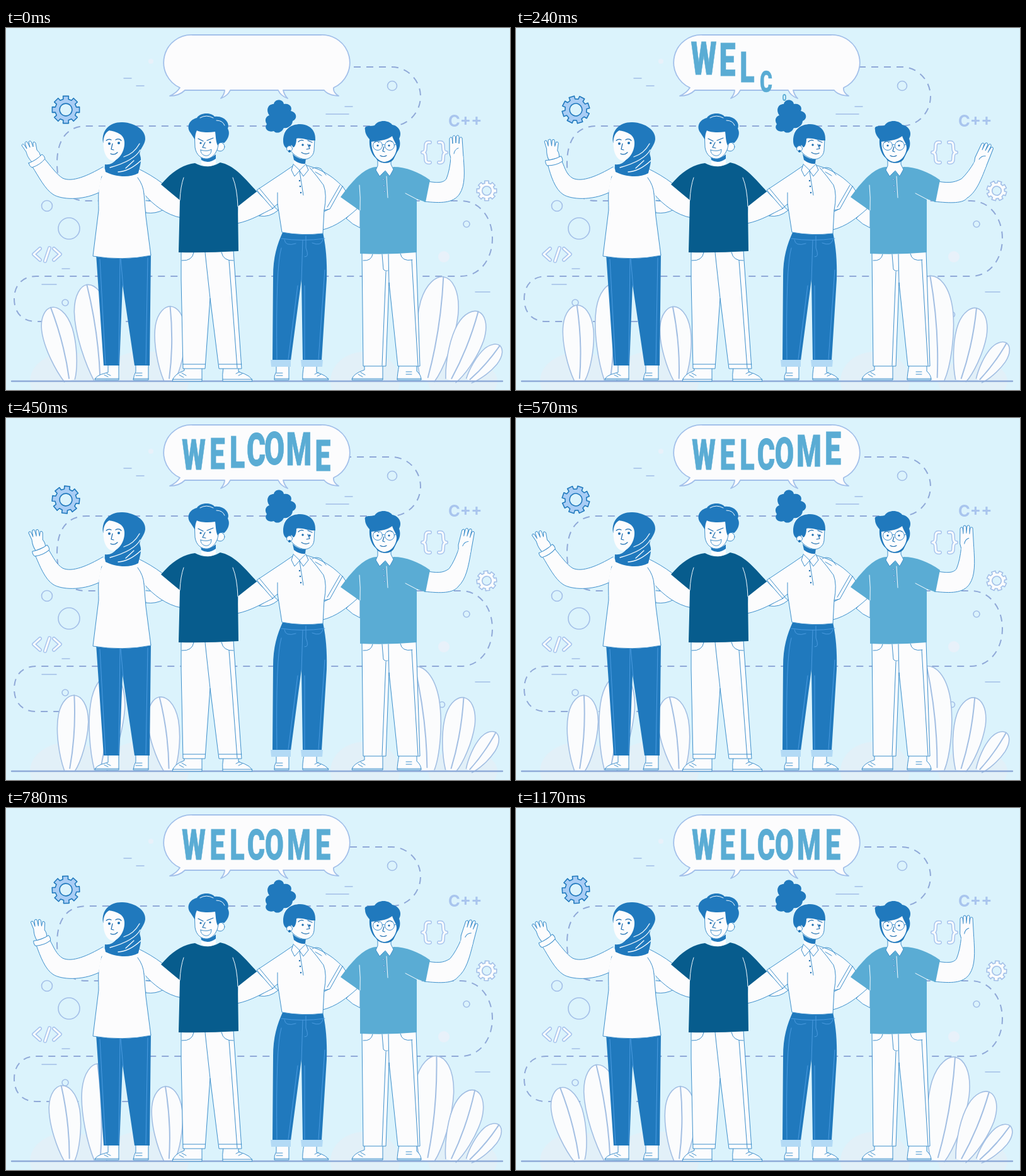
Write an HTML page that moves like this. It is 800 px wide and 576 px high and loops after 1200 ms.

```html
<!DOCTYPE html>
<html lang="en">
<head>
<meta charset="utf-8">
<title>Welcome</title>
<style>
html, body { margin: 0; width: 100%; height: 100%; overflow: hidden; background: #dbf3fc; }
svg { display: block; width: 800px; height: 576px; }
path, circle, ellipse { fill: none; stroke-linecap: round; stroke-linejoin: round; }
.people { stroke: #3f90cc; stroke-width: 1; }
.people .w { fill: #fcfcfd; }
.people .b { fill: #2079bd; stroke: none; }
.people .navy { fill: #075c8d; stroke: none; }
.people .sky { fill: #5aacd4; stroke: none; }
.people .cuff { fill: #b3daf5; stroke: none; }
.people .seam { stroke: #4a9be0; }
.people .light { stroke: #f4fbff; }
.people .ink { stroke: #1b6db0; stroke-width: 1.2; }
.people .dot { fill: #1b6db0; stroke: none; }
.deco { stroke: #a3bfe8; stroke-width: 1.6; }
.spot { fill: #e8f1fa; }
.bubble { fill: #fcfcfd; stroke: #a3c0ea; stroke-width: 1.8; }
.trail { stroke: #90a9d8; stroke-width: 2; stroke-dasharray: 11 9; stroke-linecap: butt; }
.leaf { fill: #fbfcfd; stroke: #a3bfe3; stroke-width: 1.6; }
.vein { stroke: #a3bfe3; stroke-width: 2; }
.mound ellipse { fill: #e2f0f8; }
.glyph { stroke: #a9c5ee; stroke-width: 6; }
.glyph.in { stroke: #fafcfd; stroke-width: 3; }
#letters text { font: 900 67.5px Roboto, sans-serif; fill: #5aacd4; stroke: #5aacd4; stroke-width: .8; text-anchor: middle; }
.cpp { font: 700 25.5px Inter, sans-serif; fill: #a9c5ee; }
</style>
</head>
<body>
<svg viewBox="0 0 800 576">
  <path id="trail" class="trail" d="M545 62H612A46 47 0 0 1 612 156H128C95 156 81 180 81 215C81 252 95 275 128 275H722C752 275 772 302 772 335S752 395 722 395H48C25 395 13 410 13 431S25 467 48 467H222"/>

  <g class="deco">
    <circle cx="613" cy="92" r="7.5"/><circle cx="65" cy="283" r="8.5"/><circle cx="100" cy="319" r="17"/>
    <circle cx="731" cy="312" r="5"/><circle cx="94" cy="437" r="5"/><circle cx="692" cy="456" r="4.5"/>
    <path d="M187 80H199M207 92H219M508 137H544M538 125H550M57 408H80M89 383H101M745 420H768"/>
  </g>
  <circle class="spot" cx="695" cy="364" r="9"/><circle class="spot" cx="230" cy="53" r="4"/>
  <text class="cpp" x="702" y="157">C++</text>
  <defs>
    <path id="code" d="M54 351L44 360L54 369M69 350L62 371M76 351L86 360L76 369"/>
    <path id="braces" d="M673 182C666 181 666 185 666 190C666 195 665 198 661 198C665 198 666 201 666 206C666 211 666 215 673 214M687 182C694 181 694 185 694 190C694 195 695 198 699 198C695 198 694 201 694 206C694 211 694 215 687 214"/>
  </defs>
  <use href="#code" class="glyph"/><use href="#code" class="glyph in"/>
  <use href="#braces" class="glyph"/><use href="#braces" class="glyph in"/>
  <g id="gears"></g>

  <path class="bubble" d="M296 11H500A44 44 0 0 1 520 95Q519 103 528 108Q511 107 505 99H440Q442 107 447 112Q436 108 432 99H356Q352 108 341 112Q347 105 347 99H284Q275 108 260 108Q270 104 276 95A44 44 0 0 1 296 11Z"/>
  <g id="letters"></g>

  <g class="mound">
    <ellipse cx="100" cy="562" rx="62" ry="46"/><ellipse cx="220" cy="562" rx="70" ry="48"/>
    <ellipse cx="570" cy="562" rx="55" ry="47"/><ellipse cx="725" cy="562" rx="55" ry="34"/>
  </g>
  <g id="plants"></g>
  <path d="M9 562H788" stroke="#8eaad8" stroke-width="2.4"/>

  <g class="people">
    <!-- arms that reach behind backs -->
    <path class="w" d="M219 275L222 294Q238 296 250 289L238 276Z"/>
    <path class="w" d="M402 299Q418 302 432 290L425 284Z"/>
    <path class="w" d="M398 260L368 282L367 311C390 306 405 296 424 287Z"/>
    <path class="w" d="M556 286L540 303Q550 313 562 318V290Z"/>
    <path class="w" d="M534 252L513 288L503 293V321C525 315 540 303 557 288Z"/>

    <!-- woman with headscarf -->
    <path class="w" d="M162 535V548L158 549Q142 553 141 560H179V535Z"/>
    <path class="w" d="M206 535V547Q203 552 202 560H226V535Z"/>
    <path d="M160 550l6 3M156 552l6 3M141 558H179M206 549h10M206 553h10M202 558H226"/>
    <path class="b" d="M143 360L155 537H180L185 408L204 537H228L230 360Z"/>
    <path class="seam" d="M182 366L186 412M181 366L179 535M149 368L158 535M225 366L222 535"/>
    <path class="w" d="M210 224C236 236 262 256 278 274V302C254 297 234 282 219 264Z"/>
    <path class="w" stroke="none" d="M152 222Q182 240 212 225L221 238L222 300L230 362Q185 371 138 363L147 290L146 250Z"/>
    <path d="M152 236C145 250 147 270 147 290L138 363Q185 371 230 362L222 300L219 264"/>
    <path d="M209 238Q218 250 219 264"/>
    <path class="w" id="armL"/>
    <g id="handL">
      <path class="w" d="M41 213C34 206 33 200 32 197L25 187q1-4 4-1L33 192L30 183q2-4 4-1L38 190L36 181q2-3 4 0L43 189L43 182q2-2 4 1L49 194Q54 198 55 204Z"/>
      <path class="w" d="M36 215Q49 210 57 201Q61 203 62 208Q54 218 41 222Q37 220 36 215Z"/>
    </g>
    <path class="b" d="M154 182C151 162 166 149 185 150C206 151 222 163 221 177C220 188 210 194 213 203C216 211 212 222 210 231C196 239 174 237 158 229Q156 223 157 217Q168 219 176 208Z"/>
    <path class="w" stroke="none" d="M155 190C153 175 157 166 164 163C174 165 187 168 188 181C189 196 180 208 172 211C163 212 156 203 155 190Z"/>
    <path class="light" stroke-width="1.3" d="M212 184Q203 200 187 205M213 194Q204 211 165 222M214 211Q196 228 178 229M203 211L190 223"/>
    <path class="ink" d="M159 179q4-3 8-1M174 178q5-3 9 1M169 184L167 193L171 194M166 200q6 3 11-2"/>
    <circle class="dot" cx="164" cy="184" r="2"/><circle class="dot" cx="179" cy="183" r="2"/>

    <!-- man in navy shirt -->
    <path class="w" d="M283 540V545Q266 551 264 562H311V540Z"/>
    <path class="w" d="M345 540Q343 552 344 562H391Q390 553 369 547V540Z"/>
    <path d="M279 549l7 4M275 552l7 4M264 559H311M365 550l6-3M369 553l6-3M344 559H391"/>
    <path class="w" d="M278 355V400L281 542H316L324 430L338 542H374L361 355Z"/>
    <path d="M316 357L324 430M281 535H316M338 535H374M279 370Q296 371 298 357M342 357Q345 371 361 370M354 370L367 541"/>
    <path class="navy" d="M300 215Q320 226 340 214C362 218 380 240 398 260L368 284L369 355Q320 358 274 357L276 274L246 249C262 230 280 217 300 215Z"/>
    <path class="light" d="M282 238Q277 252 276 274M360 238Q367 255 368 284"/>
    <path class="w" stroke="none" d="M310 200V217Q321 224 333 216V195Z"/>
    <path class="b" d="M309 203Q320 212 333 201V208Q321 217 310 210Z"/>
    <circle class="w" cx="340" cy="189" r="7"/>
    <path class="w" d="M299 162L300 190C302 203 311 209 320 208C329 206 336 197 337 185L334 162Z"/>
    <path class="b" d="M293 167C287 160 288 147 303 143C308 134 326 134 331 141C347 139 356 152 352 160C357 169 351 179 346 183C342 181 338 183 336 187C333 181 333 172 332 165C320 167 308 166 303 163C301 167 300 172 300 178Z"/>
    <path class="light" d="M308 143Q318 137 329 143M334 147Q344 147 347 155"/>
    <path class="ink" d="M305 176L313 180M319 179L329 175M316 182L312 190L317 191"/>
    <path class="w" d="M309 194C315 196 321 196 326 193C326 202 320 204 316 203C311 202 309 198 309 194Z"/>
    <circle class="dot" cx="309" cy="183" r="1.6"/><circle class="dot" cx="324" cy="182" r="1.6"/>

    <!-- woman with bun -->
    <path class="w" d="M429 536V547Q425 553 426 560H449V536Z"/>
    <path class="w" d="M473 536Q470 552 471 560H512Q510 553 493 548V536Z"/>
    <path d="M429 549h10M429 553h10M426 558H449M490 551l6-3M494 554l6-3M471 558H512"/>
    <path class="b" d="M440 323C430 345 424 365 424 395L423 529H452L469 400L471 529H501L509 400C510 365 507 345 503 325Z"/>
    <path class="seam" d="M437 335Q470 340 506 335M476 331V350Q482 365 474 364M471 337L469 402M442 337Q443 348 460 343M486 342Q500 348 503 337M437 350Q428 380 430 527M463 410L448 527M506 385L496 527M474 410V527"/>
    <path class="cuff" d="M420 528H452V539H421ZM468 528H503L502 539H469Z"/>
    <path class="w" d="M456 219L440 230L398 258L423 287L431 280L438 325Q470 331 503 327L505 290L514 288L534 252C520 238 505 226 478 219Z"/>
    <path d="M431 262L431 281M482 222Q494 236 504 250Q510 265 505 290M486 224Q492 220 500 224L508 234M491 229L501 235M402 255L426 284M530 250L510 285"/>
    <path class="w" stroke="none" d="M456 198L457 218L466 228L476 218V206Z"/>
    <path class="b" d="M455 200L457 210Q466 217 475 216L476 208C468 210 460 206 455 200Z"/>
    <path class="w" d="M456 217L453 226L458 236L466 227ZM476 217L480 226L472 236L466 227ZM466 228L472 266"/>
    <circle class="dot" cx="466" cy="243" r="1.2"/><circle class="dot" cx="467" cy="252" r="1.2"/><circle class="dot" cx="468" cy="262" r="1.2"/>
    <path class="b" d="M425 121C427 112 440 113 441 121C451 119 455 127 452 132C462 134 463 145 455 148C454 158 444 160 441 159C437 168 428 168 425 164C415 167 409 159 414 153C409 145 414 140 418 139C412 130 416 121 425 121Z"/>
    <path class="light" d="M442 165Q450 155 462 153" stroke-width="2"/>
    <path class="w" d="M453 180C462 170 480 170 490 177L489 195C488 205 478 211 470 208C462 206 455 200 452 195Z"/>
    <path class="b" d="M440 180C440 161 452 153 467 153C485 154 492 165 491 179C480 180 470 174 461 176C461 183 459 189 456 190L453 186L447 192C442 190 440 185 440 180Z"/>
    <circle class="w" cx="450" cy="192" r="4.5"/><circle class="dot" cx="450" cy="196" r="2"/>
    <path class="ink" stroke-width="1.8" d="M464 181q4-4 8-2M479 179l7 3"/>
    <path class="ink" d="M479 185L482 192L477 193M469 198q6 4 12 1"/>
    <circle class="dot" cx="471" cy="186" r="1.7"/><circle class="dot" cx="482" cy="187" r="1.7"/>

    <!-- man with glasses -->
    <path class="w" id="armR"/>
    <g id="handR">
      <path class="w" stroke="none" d="M706.500 211L704.500 200V176H724L725 190L725.500 211Z"/>
      <path class="w" d="M706 207L704 200V192L704 176q2-4 4-1L709 184L709 173q2-4 4.500 0L714 183L715 172q2-3 4 0V184L720 175q2-3 4 0L725 190L726 205" stroke-dasharray="none"/>
      <path class="w" stroke="none" d="M706.500 211V204H725.500V211Z"/>
      <path d="M711 200Q712 193 718 191"/>
    </g>
    <path class="w" d="M569 536V544Q550 550 549 560H598V536Z"/>
    <path class="w" d="M624 536Q621 552 621 560H659Q659 552 652 546V536Z"/>
    <path d="M563 548l7 4M559 551l7 4M549 558H598M635 547h9M635 551h9M621 558H659"/>
    <path class="w" d="M565 357L567 538H603L608 405L622 538H657L651 355Z"/>
    <path d="M607 360L608 410M597 360L599 384Q603 388 606 386M567 370Q580 371 582 360M626 359Q628 372 645 369M603 388L597 537M644 369L654 537"/>
    <path class="sky" d="M588 221C570 222 552 240 531 269L562 291V359Q607 361 652 357L652 272L666 277L673 242C655 229 635 221 615 221Q602 236 588 221Z"/>
    <path class="light" d="M561 250Q563 270 562 290M634 263L653 273M604 236L606 270"/>
    <circle class="w" cx="599" cy="241" r="1.3"/><circle class="w" cx="600" cy="251" r="1.3"/><circle class="w" cx="601" cy="260" r="1.3"/>
    <path class="w" d="M590 205V219L587 226L593 236L602 227L609 236L615 225L611 217V205Z"/>
    <path class="b" d="M570 162C568 154 578 157 585 155C592 145 608 147 613 154C625 156 629 168 624 176C627 184 625 192 621 197L615 209C610 217 592 217 587 207C579 200 576 188 577 177C573 172 570 168 570 162Z"/>
    <path class="w" stroke="none" d="M580 181C588 180 605 179 613 172C615 179 620 184 620 191C619 204 610 213 600 213C589 212 580 199 580 181Z"/>
    <circle class="w" cx="590" cy="187" r="7.5"/><circle class="w" cx="609" cy="187" r="7.5"/>
    <path class="ink" d="M585 182q4-3 7 0M605 181q4-3 8 0M600 189L598 196L601 197M594 203q5 3 10 0"/>
    <path d="M597 186q2-2 4 0M616 186L621 185"/>
    <circle class="dot" cx="590" cy="187" r="1.6"/><circle class="dot" cx="608" cy="187" r="1.6"/>
  </g>
</svg>
<script>
const LOOP = 1200, STEP = 30;
const $ = id => document.getElementById(id);
const add = (parent, tag, attrs) => {
  const el = document.createElementNS('http://www.w3.org/2000/svg', tag);
  for (const k in attrs) el.setAttribute(k, attrs[k]);
  return parent.appendChild(el);
};
const smooth = u => (1 - Math.cos(Math.PI * Math.min(1, Math.max(0, u)))) / 2;

// Gears: eight broad teeth, turning three teeth per loop
const TOOTH = 45;
function gear(x, y, r, fill, stroke) {
  const pts = [];
  for (let i = 0; i < 8; i++) {
    for (const [off, k] of [[-.24, .78], [-.2, 1], [.2, 1], [.24, .78]]) {
      const a = i * Math.PI / 4 + off;
      pts.push((Math.cos(a) * r * k).toFixed(1) + ' ' + (Math.sin(a) * r * k).toFixed(1));
    }
  }
  const g = add($('gears'), 'g', { stroke, 'stroke-width': 1.6 });
  add(g, 'path', { d: 'M' + pts.join('L') + 'Z', style: 'fill:' + fill });
  add(g, 'circle', { r: r * .45, style: 'fill:#dbf3fc' });
  return a => g.setAttribute('transform', `translate(${x} ${y}) rotate(${a})`);
}
const gears = [
  gear(95, 130, 22, '#a9cdf5', '#2079bd'),
  gear(763, 259, 16, '#fafcfd', '#a3bfe8')
];

// Leaves: base x, width, height, resting angle, swayed angle, time lead
const leaves = [
  [150, 54, 154, -8.5, 6, 0],
  [101, 48, 120, -15, 3.5, 0],
  [259, 48, 118, 1, -7.5, 0],
  [669, 62, 167, 10.5, -7, 45],
  [706, 48, 118, 23, 10, 45],
  [735, 31, 74, 42, 35, 45]
].map(([x, w, h, from, to, lead]) => {
  const p = (a, b) => (a * w).toFixed(1) + ' ' + (-b * h).toFixed(1) + ' ';
  const g = add($('plants'), 'g');
  add(g, 'path', { class: 'leaf', d: 'M' + p(-.18, 0) + 'C' + p(-.36, .17) + p(-.56, .5) + p(-.48, .74) +
    'C' + p(-.41, .92) + p(-.17, 1) + p(0, 1) + 'C' + p(.22, 1) + p(.48, .9) + p(.52, .66) +
    'C' + p(.54, .41) + p(.35, .12) + p(.18, 0) });
  add(g, 'path', { class: 'vein', d: 'M' + p(0, 1) + 'Q' + p(.14, .5) + p(0, .03) });
  return t => g.setAttribute('transform', `translate(${x} 561) rotate(${from + (to - from) * sway(t + lead)})`);
});
const sway = t => smooth((t + 50) / 460) - smooth((t - 540) / 460) + smooth((t - 1150) / 460);

// Letters pop up from below, overshoot, then settle
const centres = [298, 335.5, 367, 397, 426, 465, 503];
const letters = [...'WELCOME'].map((ch, i) => {
  const el = add($('letters'), 'text', { y: 24 });
  el.textContent = ch;
  return t => {
    const age = t - i * 50, u = Math.min(1, Math.max(0, age / 240));
    const rest = (1 - u) ** 3 * (1 + 3 * u), back = smooth((age - 240) / 200);
    const y = 48 + 72 * rest + 10 * back;
    const s = 1.08 * (1 - rest ** 1.6) - .08 * back;
    el.style.display = age > 0 ? '' : 'none';
    el.setAttribute('transform', `translate(${centres[i]} ${y}) scale(${.64 * s} ${s})`);
  };
});

// Forearms swing about the elbows
const turn = (deg, cx, cy) => {
  const a = deg * Math.PI / 180, c = Math.cos(a), s = Math.sin(a);
  return (x, y) => `${cx + (x - cx) * c - (y - cy) * s} ${cy + (x - cx) * s + (y - cy) * c} `;
};
function wave(k) {
  let a = 20 * k, r = turn(a, 55, 247);
  $('armL').setAttribute('d', `M154 221C130 235 105 246 90 239C80 233 ${r(70, 218)}${r(61, 208)}` +
    `L${r(42, 221)}C${r(51, 235)}62 257 75 265C88 273 120 275 147 262`);
  $('handL').setAttribute('transform', `rotate(${a} 55 247)`);

  a = 28 * k;
  r = turn(a, 703, 258);
  $('armR').setAttribute('d', `M664 243C684 247 694 247 ${r(699, 240)}C${r(703, 230)}${r(705, 218)}${r(706, 207)}` +
    `L${r(726, 205)}C${r(728, 230)}${r(729, 250)}${r(720, 264)}C710 279 690 279 664 276`);
  $('handR').setAttribute('transform', `rotate(${a} 703 258)`);
}

function draw(now) {
  const t = Math.floor(now % LOOP / STEP) * STEP, p = t / LOOP;
  $('trail').setAttribute('stroke-dashoffset', -7 + 40 * p);
  gears.forEach((spin, i) => spin((i ? -3 : 3) * TOOTH * p));
  leaves.forEach(move => move(t));
  letters.forEach(move => move(t));
  wave((1 - Math.cos(t / 300 * Math.PI)) / 2);
}

const start = performance.now();
(function tick() {
  draw(performance.now() - start);
  requestAnimationFrame(tick);
})();
</script>
</body>
</html>
```
